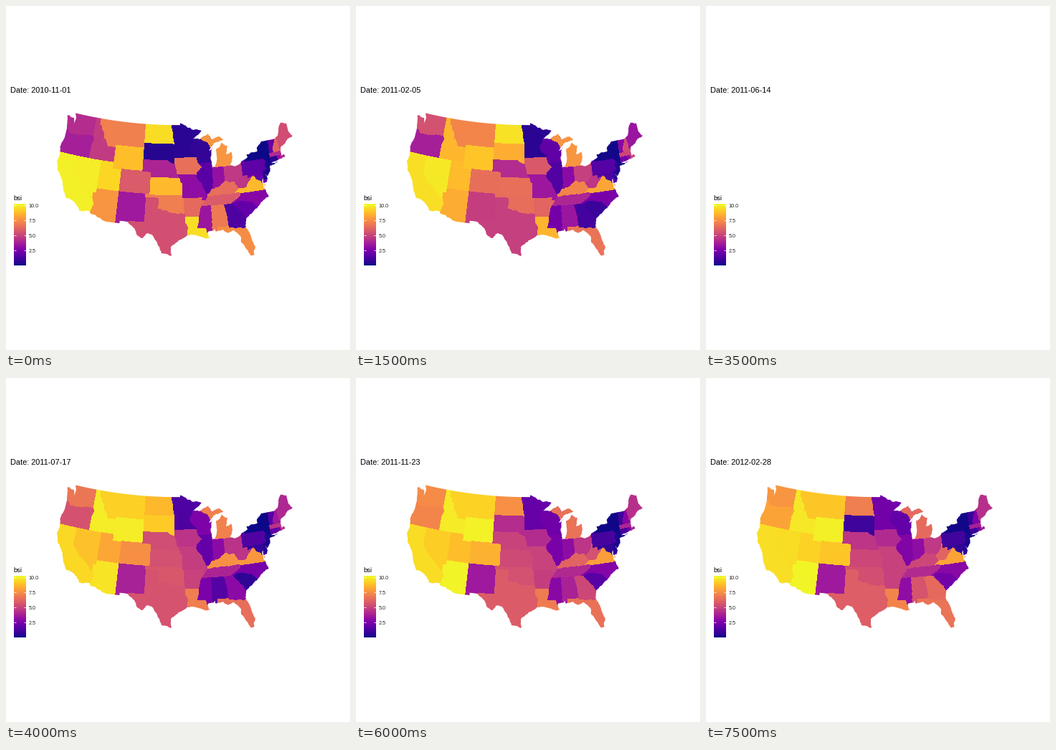
Animation, 480 px wide and 480 px high, one loop 8 s. Source, as a matplotlib script:

```python
import numpy as np
import matplotlib.pyplot as plt
from matplotlib.animation import FuncAnimation
from matplotlib.collections import PolyCollection
from matplotlib.path import Path

FRAMES, STEP_MS, DAYS = 16, 500, 484
START = np.datetime64("2010-11-01")
KEY_GAP = 5     # frames between the key levels of a state
EMPTY = 7       # no data for this date
LAT0 = 30       # where the cone touches the globe
PX = 0.75       # points per pixel at 96 dpi

rng = np.random.default_rng(4)
rings, levels = [], []


def project(west, lat):
    """Perspective conic projection, in stage pixels."""
    base = np.radians(LAT0)
    rho = 1 / np.tan(base) - np.tan(np.radians(lat) - base)
    theta = np.sin(base) * np.radians(95.85 - west)
    return np.column_stack([239.2 + 440 * rho * np.sin(theta),
                            440 * rho * np.cos(theta) - 444.4])


def border(a, b):
    """Points from a up to b: surveyed lines stay straight, others get rough."""
    d = b - a
    size = np.hypot(*d)
    if np.min(np.abs(d)) < 1e-6:
        t = np.linspace(0, 1, int(size / 0.5) + 2)[:-1, None]
        return list(a + t * d)
    if size < 0.25:
        return [a]
    shift = rng.normal(0, 0.08) * min(size, 1)
    mid = (a + b) / 2 + shift * np.array([-d[1], d[0]]) / size
    return border(a, mid) + border(mid, b)


def ring(corners):
    pts = np.reshape(corners, (-1, 2)).astype(float)
    rough = [p for a, b in zip(pts, np.roll(pts, -1, axis=0)) for p in border(a, b)]
    return project(*np.array(rough).T)


def box(west, east, south, north):
    return west, north, east, north, east, south, west, south


def state(keys, *shapes):
    """Later states cover the loose edges of earlier ones; the coast clips all."""
    for shape in shapes:
        rings.append(ring(shape))
        levels.append(keys)


def level(keys, k):
    """Level at step k, easing out towards each key."""
    i = min(k // KEY_GAP, len(keys) - 2)
    t = np.sin((k / KEY_GAP - i) * np.pi / 2)
    return keys[i] + t * (keys[i + 1] - keys[i])


# Degrees west and north
north = (122.76, 49, 95.15, 49, 95.15, 49.38, 93.3, 48.6, 90.8, 48.2, 89.6, 48)
lakes = (92.05, 46.7, 90.4, 46.6, 88, 47.45, 87.4, 46.5, 85, 46.75, 84.2, 46.2,
         86.6, 45.8, 87.6, 45.1, 88, 44.55, 87.1, 45.2, 87.75, 43.5, 87.6, 41.65,
         86.8, 41.76, 86.25, 43.1, 86.3, 44.7, 85, 45.5, 84.7, 45.77, 83.4, 45.1,
         83.9, 43.7, 82.6, 44, 82.45, 43, 83.3, 41.75, 82, 41.5, 78.9, 42.7,
         79, 43.25, 76.3, 43.5, 76.3, 44.1, 75, 45, 71.5, 45)
atlantic = (70.4, 45.8, 70, 46.7, 69.2, 47.45, 67.8, 47.07, 67.8, 45.7, 67, 44.85,
            69, 44.1, 70.6, 43.3, 70.8, 42.6, 70.7, 41.9, 70.1, 42.05, 70, 41.65,
            71.85, 41.32, 73.6, 41.02, 71.95, 41.05, 72.9, 40.68, 74.05, 40.55,
            74.1, 39.8, 74.9, 38.95, 75.5, 39.5, 75.05, 38.5, 75.95, 37.2,
            76.1, 39.1, 76.4, 38, 76.3, 37, 75.9, 36.5, 75.5, 35.25, 77.4, 34.5,
            78, 33.87, 79.2, 33.2, 81.1, 32, 81.45, 30.7, 80.55, 28.4, 80.05, 26.9,
            80.4, 25.2)
gulf = (81.1, 25.15, 82.1, 26.9, 82.75, 27.8, 82.7, 28.8, 84, 30.1, 85.3, 29.7,
        86.3, 30.4, 87.9, 30.25, 88, 30.7, 88.2, 30.35, 89.5, 30.2, 89.4, 29.5,
        89.05, 29, 90.2, 29.1, 91.8, 29.6, 93.85, 29.7, 95.3, 28.9, 97.2, 27.6,
        97.15, 25.9)
south = (99.1, 26.4, 99.5, 27.5, 100.7, 29.1, 101.4, 29.77, 102.5, 29.8,
         103.1, 28.98, 104.5, 29.65, 104.9, 30.6, 106.5, 31.78, 108.2, 31.78,
         108.2, 31.33, 111.07, 31.33, 114.82, 32.5, 114.72, 32.72, 117.12, 32.53)
pacific = (118.4, 33.85, 120.6, 34.5, 121.9, 36.5, 122.5, 37.7, 123.8, 39,
           124.4, 40.4, 124.1, 41.5, 124.5, 42.84, 124, 44.6, 124, 46.2,
           124.7, 48.38, 122.8, 48.15, 122.5, 47.2, 122.3, 48.2)
coast = Path(ring(north + lakes + atlantic + gulf + south + pacific), closed=False)

# West
state((69, 71, 95, 88), box(116.1, 104.05, 44.4, 49))        # Montana
state((36, 36, 58, 79), box(125, 116.5, 42, 46.5))           # Oregon
state((41, 56, 68, 75),                                      # Washington
      (125, 49.1, 116.9, 49.1, 116.9, 46, 119, 46, 121, 45.65, 122.8, 45.65,
       123.4, 46.2, 125, 46.28))
state((46, 93, 98, 96),                                      # Idaho
      (117.03, 49.1, 116.05, 49.1, 116.05, 48, 114.5, 46.6, 114.5, 45.6,
       113.95, 45.7, 113, 44.45, 111.05, 44.5, 111.05, 42, 117.03, 42, 117.03, 44,
       116.6, 45.5, 117.03, 46.4))
state((98, 93, 92, 94), box(125, 114, 32.3, 42))             # California
state((97, 96, 85, 93),                                      # Nevada
      (120, 42, 113.9, 42, 113.9, 36, 114.63, 35, 120, 39))
state((92, 84, 79, 91), box(114.04, 109, 37, 42))            # Utah
state((86, 88, 99, 98), box(111.05, 104.05, 41, 45))         # Wyoming
state((57, 65, 75, 88), box(109.05, 102.05, 37, 41))         # Colorado
state((75, 83, 98, 99),                                      # Arizona
      (114.04, 37, 109.05, 37, 109.05, 31.2, 115, 31.2, 114.72, 32.72,
       114.2, 34.3, 114.63, 35, 114.75, 36.1, 114.04, 36.2))

# South-west and plains
state((53, 46, 56, 58), box(107, 93.4, 25.5, 36.5))          # Texas
state((34, 50, 34, 34),                                      # New Mexico
      (109.05, 37, 103.04, 37, 103.04, 32, 106.6, 32, 106.6, 31, 109.05, 31))
state((62, 60, 46, 48),                                      # Arkansas
      (94.6, 36.5, 89.6, 36.5, 89.6, 35, 90.9, 33, 94.04, 33, 94.04, 33.6,
       94.5, 33.6))
state((68, 62, 54, 53),                                      # Oklahoma
      (103.04, 37, 94.62, 37, 94.43, 35.4, 94.48, 33.64, 97, 33.8, 100, 34.56,
       100, 36.5, 103.04, 36.5))
state((94, 81, 65, 70),                                      # Louisiana
      (94.04, 33, 90.9, 33, 90.9, 31.1, 89.5, 31.1, 89.5, 30.2, 88.8, 30,
       88.8, 28.8, 94, 29, 93.7, 30.1, 93.55, 31.2, 94.04, 32))
state((4, 100, 86, 9), box(104.05, 96.4, 42.6, 45.94))       # South Dakota
state((93, 95, 82, 68), box(104.05, 96.4, 45.94, 49))        # North Dakota
state((38, 41, 55, 44),                                      # Nebraska
      (104.05, 43, 98.5, 43, 96.4, 42.4, 95.2, 41, 95.2, 40, 102.05, 40,
       102.05, 41, 104.05, 41))
state((85, 59, 52, 50), box(102.05, 94.62, 37, 40))          # Kansas

# Midwest
state((7, 20, 26, 18), box(93, 87, 42.5, 47))                # Wisconsin
state((16, 13, 20, 26), box(91.6, 87.4, 36.95, 42.5))        # Illinois
state((5, 5, 15, 22),                                        # Minnesota
      (97.23, 49.5, 89, 49.5, 89, 47.9, 92.05, 46.7, 92.3, 46.1, 92.85, 45.6,
       92.75, 44.75, 91.22, 43.5, 96.45, 43.5, 96.45, 45.3, 96.56, 46, 97.23, 49))
state((64, 54, 41, 40),                                      # Iowa
      (96.5, 43.5, 91.22, 43.5, 91.1, 42.7, 90.2, 41.8, 91.1, 41.2, 91.5, 40.58,
       95.77, 40.58, 96.1, 41.7, 96.45, 42.5))
state((31, 28, 29, 30),                                      # Indiana
      (87.53, 42, 84.8, 42, 84.8, 38.2, 88, 37.6, 87.53, 39.35))
state((45, 48, 42, 45), box(84.8, 80.52, 38.3, 42.2))        # Ohio
state((75, 75, 68, 62), box(86.9, 82, 41.73, 45.9),          # Michigan
      (90.4, 46.6, 89, 48, 83.5, 48, 83.5, 45.9, 86.6, 45.7, 87.6, 45.1,
       88.1, 45.9))

# South-east
state((73, 63, 63, 65), box(87.6, 79.5, 24.5, 31.1))         # Florida
state((33, 20, 25, 30),                                      # Mississippi
      (90.3, 35, 88.1, 35, 88.4, 30, 89.5, 30, 89.73, 31, 91.6, 31, 91.1, 32.2,
       91.17, 33, 90.6, 34.6))
state((67, 25, 12, 55),                                      # Alabama
      (88.2, 35, 85.5, 35, 84.9, 31, 87.6, 31, 87.5, 30, 88.4, 30, 88.45, 32))
state((13, 10, 33, 62),                                      # Georgia
      (85.6, 35, 83, 35, 81, 32, 81, 30.7, 82.05, 30.36, 82.2, 30.57,
       84.86, 30.7, 85, 32.3))
state((85, 78, 75, 79),                                      # Virginia
      (83.68, 36.5, 75.5, 36.5, 76.2, 37.9, 77, 38.9, 78.35, 39.4, 80, 38.3,
       82.1, 37.6))
state((27, 23, 24, 28),                                      # North Carolina
      (84.3, 35, 83, 36, 81.68, 36.55, 75, 36.55, 75, 33.5, 78.5, 33.7, 80, 34.6,
       83.1, 35))
state((18, 6, 6, 22),                                        # South Carolina
      (83.1, 35, 82.3, 35.2, 81.05, 35.1, 79.67, 34.8, 78.4, 33.7, 80.5, 31.8,
       81.1, 32.1, 81.5, 33, 83.35, 34.7))
state((44, 44, 44, 60),                                      # West Virginia
      (82.6, 38.2, 81.97, 37.53, 80.3, 37.6, 79.6, 38.5, 78.35, 39.4, 77.75, 39.3,
       78.2, 39.65, 79.48, 39.2, 79.48, 39.72, 80.52, 39.72, 80.52, 40.6,
       80.9, 39.7, 82.2, 38.6))
state((63, 72, 74, 50),                                      # Kentucky
      (89.4, 36.5, 83.68, 36.6, 82, 37.5, 82.8, 38.7, 83.7, 38.65, 84.8, 39.1,
       86.3, 38.1, 88, 37.85, 88.5, 37.1, 89.15, 36.95))
state((57, 34, 39, 40),                                      # Tennessee
      (89.5, 36.5, 88.05, 36.5, 83.68, 36.6, 81.68, 36.59, 82, 36.1, 84.3, 35,
       90.2, 35, 89.7, 36))
state((30, 34, 50, 48),                                      # Missouri
      (95.77, 40.58, 91.6, 40.58, 91.4, 39.9, 90.2, 38.8, 90.2, 38.4, 89.15, 36.9,
       89.7, 36, 90.37, 36, 90.15, 36.5, 94.62, 36.5, 94.62, 39.1, 95.3, 40))

# North-east
state((0, 1, 0, 1),                                          # New York
      (79.76, 42, 79.76, 44, 75, 45.2, 73.3, 45.2, 73.2, 42.1, 73.5, 41.1,
       71.7, 41.25, 71.7, 40.4, 74.2, 40.4, 75.3, 41.9))
state((17, 14, 14, 10),                                      # Pennsylvania
      (80.52, 42.5, 79.76, 42.5, 79.76, 42, 75.35, 42, 74.7, 41.35, 75.1, 40.9,
       74.75, 40.2, 75.4, 39.72, 80.52, 39.72))
state((18, 12, 6, 7),                                        # Maryland
      (79.48, 39.72, 75.6, 39.72, 75, 38.4, 75.4, 37.9, 76.2, 37.9, 77.05, 38.5,
       77.75, 39.3, 78.2, 39.65, 79.48, 39.2))
state((3, 7, 3, 5), box(75.79, 75, 38.45, 39.8))             # Delaware
state((2, 4, 2, 2),                                          # New Jersey
      (74.7, 41.35, 74, 41, 74, 38.8, 75, 38.8, 75.5, 39.5, 74.75, 40.2,
       75.1, 40.9))
state((18, 30, 12, 8),                                       # Vermont
      (73.35, 45.1, 71.4, 45.1, 72.3, 42.73, 73.27, 42.73, 73.4, 44.1))
state((60, 50, 30, 25),                                      # New Hampshire
      (71.5, 45, 71, 45.4, 70.9, 43.4, 70.6, 42.73, 72.45, 42.73, 72.05, 44.1))
state((52, 28, 42, 42),                                      # Maine
      (71.1, 45.3, 71, 48, 66, 48, 66, 43, 70.6, 43, 70.97, 43.4))
state((40, 52, 41, 37), box(73.5, 69.5, 41.3, 42.73))        # Massachusetts
state((5, 28, 16, 8), box(73.5, 71.8, 41.08, 42.03))         # Connecticut
state((30, 30, 20, 20), box(71.8, 71.2, 41.2, 42.03))        # Rhode Island

fig = plt.figure(figsize=(5, 5), dpi=96, facecolor="white")
ax = fig.add_axes([0, 0, 1, 1])
cmap = plt.get_cmap("plasma")


def label(x, y, text, size, color="black"):
    return ax.text(x, y, text, fontsize=size * PX, color=color,
                   family="Liberation Sans", va="baseline")


# Colour bar
ax.imshow(np.linspace(1, 0, 86)[:, None], cmap=cmap, vmin=0, vmax=1, aspect="auto",
          extent=(11, 28, 362, 276), interpolation="nearest")
label(10.7, 271, "bsi", 9.3)
for value in (2.5, 5.0, 7.5, 10.0):
    y = 362.2 - 8.4 * value
    ax.hlines([y, y], [11, 24.6], [14.4, 28], color="white", lw=0.8 * PX)
    label(31.7, y + 2.5, f"{value:.1f}", 7.3, "#222222")

states = PolyCollection(rings, linewidths=0, edgecolors="none", antialiaseds=False)
states.set_snap(False)
ax.add_collection(states, autolim=False)
title = label(5.5, 121, "", 11)
ax.set(xlim=(0, 480), ylim=(480, 0))
ax.axis("off")
states.set_clip_path(coast, ax.transData)


def draw(k):
    title.set_text(f"Date: {START + k * DAYS // (FRAMES - 1)}")
    states.set_facecolor([cmap(level(keys, k) / 100) for keys in levels])
    states.set_visible(k != EMPTY)
    return states, title


anim = FuncAnimation(fig, draw, frames=FRAMES, interval=STEP_MS, repeat=True,
                     repeat_delay=0)
plt.show()
```
